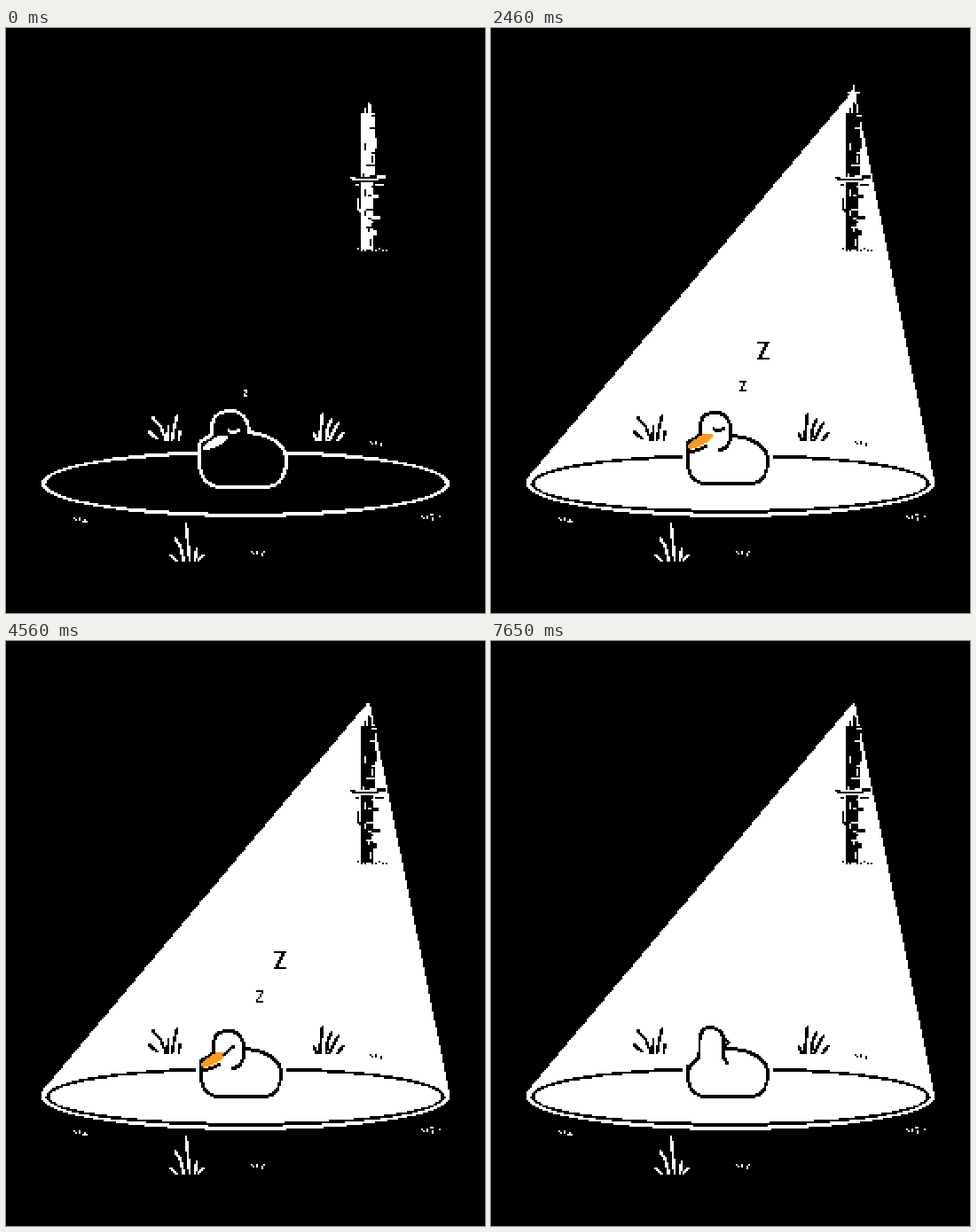
Recreate the animation shown at these times as an HTML page with a canvas. Size 540 by 660 pixels, loop 7680 ms.

```html
<!DOCTYPE html>
<html lang="en">
<head>
<meta charset="utf-8">
<title>Sleeping duck</title>
<style>
  html, body { margin: 0; width: 100%; height: 100%; overflow: hidden; background: #000; }
  canvas { display: block; width: 540px; height: 660px; image-rendering: pixelated; }
</style>
</head>
<body>
<canvas id="stage" width="270" height="330"></canvas>
<script>
const LOOP = 7680, LIGHT_ON = 2400, SQUINT = 4450, WAKE = 4750, TURN = 5200;
const BREATH = 3400, Z_GAP = 680, Z_LIFE = 1700, Z_COUNT = 7;
const WHITE = '#fff', BLACK = '#000', ORANGE = '#ff981c';

const W = 270, H = 330;
const out = document.getElementById('stage').getContext('2d');
const pad = document.createElement('canvas');
pad.width = W;
pad.height = H;
const c = pad.getContext('2d', { willReadFrequently: true });
c.lineCap = c.lineJoin = 'round';

const mix = (a, b, k) => a + (b - a) * Math.min(1, Math.max(0, k));
const wave = (t, period) => Math.cos(2 * Math.PI * t / period);

function fill(path, color) {
  c.fillStyle = color;
  c.fill(path);
}

function stroke(path, color, width) {
  c.strokeStyle = color;
  c.lineWidth = width;
  c.stroke(path);
}

function rects(list, color) {
  c.fillStyle = color;
  for (const r of list) c.fillRect(...r);
}

function poly(points) {
  const p = new Path2D();
  points.forEach(([x, y]) => p.lineTo(x, y));
  p.closePath();
  return p;
}

function oval(x, y, rx, ry, color) {
  const p = new Path2D();
  p.ellipse(x, y, rx, ry, 0, 0, 7);
  fill(p, color);
}

// Scenery
const tufts = {
  left: 'M80.5,227.5 L85,231.5 M82.5,219.5 L87,224.5 L90,232 M91.5,224.5 L91.2,232 M96.5,218.5 L95,224 L93.8,232 M98,227 L97.5,232',
  right: 'M173.8,229 L175,232.5 M178.3,218 L177.5,225 L176.8,232.5 M183.3,221 L181,227 L180.5,232.5 M187.3,223 L184,229 L182.5,232.5 M190,228.5 L187,232.5',
  front: 'M93,297.5 L96,300.5 M95.5,288 L98.5,293 L100,300 M101.5,280 L102.5,290 L103.5,300 M107.5,294 L106.5,300 M111,297.5 L108.8,300'
};
for (const k in tufts) tufts[k] = new Path2D(tufts[k]);

function speck(x, y, color) {
  rects([[x, y, 1, 1], [x + 1, y + 1, 1, 1], [x + 3, y, 1, 2], [x + 6, y + 1, 1, 2]], color);
}

let seed = 11;
const rand = n => {
  seed = (seed * 16807) % 2147483647;
  return Math.floor(seed / 2147483647 * n);
};
const nicks = Array.from({ length: 22 }, (_, i) => i % 3
  ? [203 + rand(4), 49 + rand(74), 2 + rand(3), 1]
  : [201 + rand(6), 49 + rand(74), 1, 2 + rand(3)]);
const post = [
  [202, 45, 1, 3], [204, 42, 1, 6], [205, 43, 1, 5],
  [200, 48, 8, 36], [208, 62, 1, 6], [200, 87, 7, 38],
  [198, 96, 1, 7], [199, 102, 1, 2], [207, 94, 3, 2],
  [207, 106, 4, 2], [207, 114, 2, 3]
];
const bar = [[194, 84, 3, 1], [195, 85, 15, 1], [209, 83, 5, 2], [208, 88, 5, 1], [197, 88, 2, 1]];

function scenery(ink, paper) {
  rects(post, ink);
  rects(nicks, paper);
  rects([[199, 84, 9, 2]], paper);
  rects(bar, ink);
  for (let x = 198; x < 215; x += 2) rects([[x, x % 6 ? 125 : 124, 1, 1]], ink);
  stroke(tufts.left, ink, 1.7);
  stroke(tufts.right, ink, 1.7);
  speck(205, 233, ink);
  stroke(tufts.front, WHITE, 1.7);
  speck(38, 276, WHITE);
  rects([[43, 278, 1, 1], [45, 278, 1, 1]], WHITE);
  speck(234, 275, WHITE);
  rects([[239, 274, 2, 1], [244, 275, 1, 1]], WHITE);
  speck(138, 295, WHITE);
  rects([[145, 295, 1, 1]], WHITE);
}

// Light
function cone(t) {
  const g = 1 + wave(t - 3720, 520);
  const apex = 34.8 + 0.8 * wave(t - 3040, 560);
  fill(poly([
    [204, apex], [205, apex], [249.5 + g, 254], [249.5 + g, 256], [247, 258],
    [23, 258], [20.5 - g, 256], [20.5 - g, 254]
  ]), WHITE);
}

function spark(t) {
  const r = t < LIGHT_ON ? mix(0.6, 9, (t - 2090) / 310) : mix(9, 0, (t - LIGHT_ON) / 200);
  if (t < 2080 || r <= 0) return;
  const n = Math.max(0.6, r * 0.2);
  const star = [];
  for (let i = 0; i < 8; i++) {
    const a = i * Math.PI / 4, d = i % 2 ? n : r;
    star.push([204.5 + d * 0.75 * Math.cos(a), 36.5 + d * Math.sin(a)]);
  }
  rects([[204, 36, 1, 1]], WHITE);
  fill(poly(star), WHITE);
}

// Pond
function pond(lit) {
  oval(135, 257, 115, 18.9, WHITE);
  oval(135, 257, 112.7, 16.9, BLACK);
  if (lit) oval(135, 257, 110.4, 14.9, WHITE);
}

// Duck
const body = new Path2D('M111.2,240 C109.8,250 113,257 122,257 L146,257 C153,257 156,251 156,244 C156,236 147,230.5 135,230');
const breast = new Path2D('M111.2,241 L111.2,236 L118,229 L135,230 Z');
const sleepHead = new Path2D('M118,230.5 C117.5,227 117.7,224.5 118.5,222.5 C120,219 122.5,218 126,218 C131.5,218 134.5,221.5 135,227 C135.5,233 134,238.5 129,239.3');
const beak = new Path2D('M117.5,231.5 L120,230.3 L125.3,230.3 L124,233 L119.5,236 L112.5,238.5 L111,238 L112,235 Z');
const beakEdge = new Path2D('M118,230 L115.5,232 L111.3,234.5 L110.6,237 L111.3,239.6 L114,239.8 L118,238.6 L121,236.8');
const lid = new Path2D('M125.5,226.8 L127,228.3 L129.3,228.3 L131,227');
const squint = new Path2D('M124,231.7 L129.5,226.5');
const backBeak = new Path2D('M132,224.3 L134.3,226.2 L132,228.2');

function headLift(t) {
  const asleep = u => wave(u, BREATH) - 1;
  const awake = u => -1 - wave(u - 6110, BREATH);
  if (t < 4400) return asleep(t);
  if (t < WAKE) return mix(asleep(4400), 2, (t - 4400) / 140);
  if (t < TURN) return mix(2, awake(TURN), (t - WAKE) / (TURN - WAKE));
  return awake(t);
}

function duck(t, lit) {
  const back = t >= TURN;
  const dx = t >= SQUINT && t < WAKE ? -1 : 0;
  const dy = Math.round(headLift(t));
  const skin = lit ? WHITE : BLACK, ink = lit ? BLACK : WHITE;
  const head = back
    ? new Path2D(`M111.2,${243 - dy} C112,${236 - dy} 117.5,239 117.5,232 L117.5,224.5 C118,220 121,218 124,218 C128.5,218 131.5,222 131.5,226 L131.3,${235 - dy} L133,${238 - dy}`)
    : sleepHead;
  const onHead = draw => {
    c.save();
    c.translate(0, dy);
    draw();
    c.restore();
  };

  c.save();
  c.translate(dx, 0);
  stroke(body, WHITE, 6);
  onHead(() => {
    stroke(head, WHITE, 6);
    if (!back) stroke(beakEdge, WHITE, 6);
  });
  fill(body, skin);
  if (!back) fill(breast, skin);
  stroke(body, BLACK, 2);
  onHead(() => {
    fill(head, skin);
    stroke(head, BLACK, 2);
    if (back) {
      stroke(backBeak, BLACK, 1.4);
      rects([[132, 226, 1, 1]], ORANGE);
      return;
    }
    stroke(beakEdge, BLACK, 2);
    fill(beak, lit ? ORANGE : WHITE);
    if (t < SQUINT) stroke(lid, ink, 1.7);
    else if (t < WAKE) stroke(squint, ink, 1.6);
    else rects([[127, 226, 2, 3]], ink);
  });
  if (back) stroke(new Path2D('M132.5,230 L136,230'), BLACK, 2);
  c.restore();
}

// Rising letters
function letter(age, ink) {
  const k = Math.min(1, age / 1640), s = Math.min(1, age / 1000);
  const rise = k < 0.5 ? 2 * k * k : 1 - 2 * (1 - k) ** 2;
  const w = Math.round(2 + 5 * s), h = Math.round(3.5 + 6.5 * s);
  const left = Math.round((269 + 0.0345 * age - w * 2) / 2 + w / 2);
  const top = Math.round((412 - 62 * rise) / 2 - h / 2);
  const thick = h >= 8 ? 2 : 1;
  rects([[left, top, w, 1], [left, top + h - 1, w, 1]], ink);
  for (let i = 1; i < h - 1; i++) {
    const step = Math.round((w - thick) * (1 - i / (h - 1)));
    rects([[left + step, top + i, thick, 1]], ink);
  }
}

function letters(t, ink) {
  for (let i = 0; i < Z_COUNT; i++) {
    const age = t - i * Z_GAP;
    if (age >= 0 && age < Z_LIFE) letter(age, ink);
  }
}

// Snap every pixel to one of three flat colours
function snap() {
  const img = c.getImageData(0, 0, W, H), d = img.data;
  for (let i = 0; i < d.length; i += 4) {
    const r = d[i], g = d[i + 1], b = d[i + 2];
    if (r - b > 90 && r > 140) {
      d[i] = 255; d[i + 1] = 152; d[i + 2] = 28;
    } else {
      d[i] = d[i + 1] = d[i + 2] = r + g + b > 380 ? 255 : 0;
    }
  }
  out.putImageData(img, 0, 0);
}

function draw(t) {
  const lit = t >= LIGHT_ON;
  const ink = lit ? BLACK : WHITE, paper = lit ? WHITE : BLACK;
  rects([[0, 0, W, H]], BLACK);
  if (lit) cone(t);
  spark(t);
  pond(lit);
  scenery(ink, paper);
  duck(t, lit);
  letters(t, ink);
  snap();
}

const start = performance.now();
function tick() {
  draw((performance.now() - start) % LOOP);
  requestAnimationFrame(tick);
}
tick();
</script>
</body>
</html>
```
